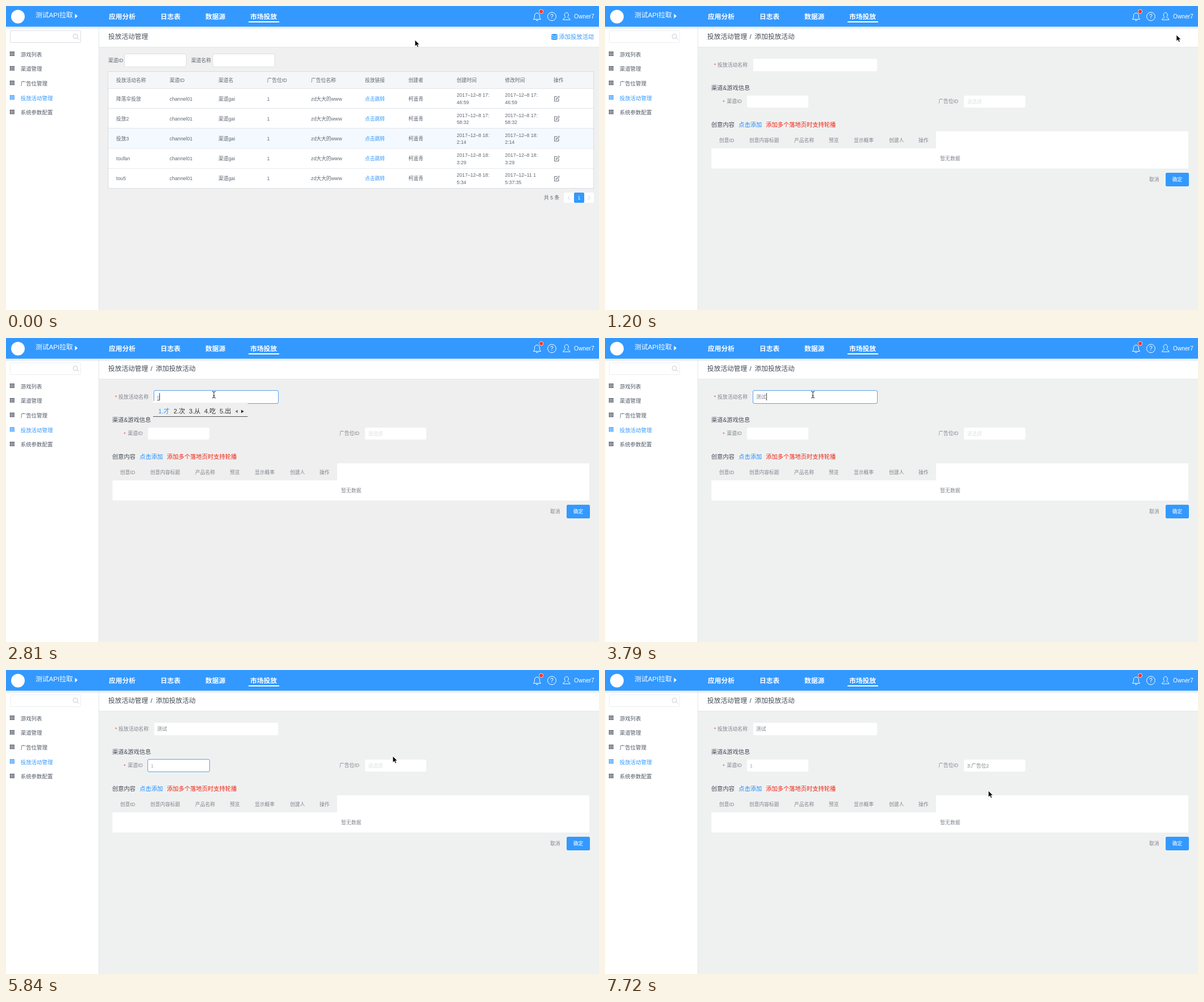
An HTML page that plays this animation: 1044x536 px, repeating every 8000 ms.

```html
<!DOCTYPE html>
<html lang="zh-CN">
<head>
<meta charset="utf-8">
<title>投放活动管理</title>
<style>
html, body { margin: 0; width: 100%; height: 100%; overflow: hidden; background: #f0f0f0; }
svg { display: block; width: 100vw; height: 100vh; }
text { font-family: "Liberation Sans", "Noto Sans CJK SC", "Noto Sans CJK", sans-serif; white-space: pre; }
</style>
</head>
<body>
<svg id="stage" viewBox="0 0 1044 536" xmlns="http://www.w3.org/2000/svg"></svg>
<script>
const BLUE = '#3399ff', INK = '#5f6773', LINE = '#d9dde2', SOFT = '#80858c';
const LOOP = 8000;

// Text is placed by its left edge and vertical centre.
const text = (x, y, s, size = 8.75, fill = INK, extra = '') =>
  `<text x="${x}" y="${(y + size * 0.37).toFixed(2)}" font-size="${size}" fill="${fill}" ${extra}>${s}</text>`;
const rect = (x, y, w, h, fill, extra = '') =>
  `<rect x="${x}" y="${y}" width="${w}" height="${h}" fill="${fill}" ${extra}/>`;
const line = (d, stroke, width = 1, extra = '') =>
  `<path d="${d}" fill="none" stroke="${stroke}" stroke-width="${width}" ${extra}/>`;
const group = (id, body) => `<g id="${id}">${body}</g>`;
const box = (x, y, w, h) => rect(x + 0.5, y + 0.5, w - 1, h - 1, '#fff', `rx="2.5" stroke="${LINE}"`);

function header() {
  const nav = [[181, '应用分析'], [272, '日志表'], [351, '数据源'], [430, '市场投放']];
  return rect(0, 0, 1044, 36.5, BLUE) +
    '<circle cx="21" cy="18.8" r="12" fill="#fff"/>' +
    text(52, 15.8, '测试API拉取', 11.7, '#fff', 'font-weight="500"') +
    '<path d="M121.5 13.7 L126 17.8 L121.5 22 Z" fill="#fff"/>' +
    nav.map(([x, s]) => text(x, 18.6, s, 11.75, '#fff', 'font-weight="600"')).join('') +
    rect(427, 27, 54, 2, '#fff') +
    line('M928.5 23.5 H941.5 C939.5 21.5 939.5 20 939.5 17.5 C939.5 14 937.5 12.5 935 12.5 C932.5 12.5 930.5 14 930.5 17.5 C930.5 20 930.5 21.5 928.5 23.5 Z M933 25.5 H937', '#fff') +
    '<circle cx="942.2" cy="9.7" r="3.6" fill="#f5372b" stroke="#fff" stroke-width=".7"/>' +
    '<circle cx="961" cy="18.5" r="7.4" fill="none" stroke="#fff"/>' +
    text(958.1, 18.5, '?', 10.5, '#fff') +
    line('M985 19.5 C982 17 983 11.7 986.8 11.7 C990.6 11.7 991.6 17 988.6 19.5 C988.6 21 993 21 993 24.3 H980.7 C980.7 21 985 21 985 19.5 Z', '#fff') +
    text(1000, 18.5, 'Owner7', 10.2, '#fff');
}

function sidebar() {
  const items = ['游戏列表', '渠道管理', '广告位管理', '投放活动管理', '系统参数配置'];
  const row = (s, i) => {
    const y = 85.3 + i * 25.65, on = i === 3;
    return rect(6.8, y - 5, 8, 7.8, on ? BLUE : '#4d5561') +
      line(`M6.8 ${y - 2.3} h8 M6.8 ${y + 0.3} h8 M9.4 ${y - 5} v8 M12.2 ${y - 5} v8`, '#fff', 0.6) +
      text(25.7, y, s, 9.45, on ? BLUE : '#535b67');
  };
  return rect(0, 36.5, 163, 500, '#fff') + rect(163, 37, 1, 499, '#e3e5e7') +
    rect(7.5, 43.5, 124, 21, '#fff', `id="search" stroke="${LINE}" rx="1"`) +
    '<circle cx="122.2" cy="53.3" r="4" fill="none" stroke="#c3c9d0"/>' +
    line('M125.2 56.3 L128.3 59.3', '#c3c9d0') +
    items.map(row).join('');
}

function listPage() {
  const cols = [194, 288, 374, 459.5, 537, 632, 708.5, 793.5, 878.5, 964];
  const heads = ['投放活动名称', '渠道ID', '渠道名', '广告位ID', '广告位名称', '投放链接', '创建者', '创建时间', '修改时间', '操作'];
  const a = ['2017–12–8 17:', '46:59'], b = ['2017–12–8 17:', '58:32'];
  const c = ['2017–12–8 18:', '2:14'], d = ['2017–12–8 18:', '3:29'];
  const rows = [['降落伞投放', a, a], ['投放2', b, b], ['投放3', c, c], ['toufan', d, d],
    ['tou5', ['2017–12–8 18:', '5:34'], ['2017–12–11 1', '5:37:35']]];
  const row = ([name, made, edited], i) => {
    const top = 146 + i * 35.2, y = top + 17.4;
    const cells = [name, 'channel01', '渠道gai', '1', 'zd大大的www', '点击跳转', '柯遥青'];
    const date = (s, x) => text(x, y - 6.3, s[0], 8.65) + text(x, y + 6.3, s[1], 8.65);
    return rect(180.5, top, 854, 35.2, '#fff', `id="row${i}"`) +
      line(`M180 ${Math.round(top + 35.2) - 0.5} H1035`, '#e1e5ea') +
      cells.map((s, k) => text(cols[k], y, s, 8.75, k === 5 ? BLUE : INK)).join('') +
      date(made, cols[7]) + date(edited, cols[8]) +
      line(`M970 ${y - 3.6} h-4.3 v8 h7.3 v-4.3 M968.3 ${y + 1.7} l.5 -2 l4.4 -4.3 l1.3 1.3 l-4.4 4.4 Z`, '#515a65', 0.9);
  };
  return text(180, 54, '投放活动管理', 11.7, '#4a525e', 'font-weight="500"') +
    '<path d="M960 51 C960 48.6 971 48.6 971 51 V58 C971 60.4 960 60.4 960 58 Z" fill="#3399ff"/>' +
    line('M960 52 Q965.5 55 971 52 M960 55.5 Q965.5 58.5 971 55.5', '#fff', 0.9) +
    text(973.5, 54.5, '添加投放活动', 10.25, BLUE) +
    text(180, 96, '渠道ID') + box(208, 84, 110, 24) +
    text(326, 96, '渠道名称') + box(363.5, 84, 110, 24) +
    rect(180, 115, 855, 31, '#f5f6f8') + line('M180 145.5 H1035', '#e1e5ea') +
    heads.map((s, i) => text(cols[i], 131, s)).join('') +
    rows.map(row).join('') +
    rect(179.5, 115.5, 855, 206, 'none', `stroke="${LINE}"`) +
    text(947, 338, '共 5 条') +
    rect(982, 329, 53, 18, '#fff', 'rx="2"') + rect(1000, 329, 18, 18, BLUE, 'rx="2"') +
    text(1006.6, 338, '1', 8.75, '#fff') +
    line('M993 334.5 l-3.5 3.7 l3.5 3.7 M1024.5 334.5 l3.5 3.7 l-3.5 3.7', '#c5cad0', 0.9);
}

// A white input with a hidden one-pixel focus ring on its outer edge.
const field = (id, x, y, w, h) => rect(x + 1, y + 1, w - 2, h - 2, '#fff', 'rx="2.5"') +
  rect(x + 0.5, y + 0.5, w - 1, h - 1, 'none', `id="${id}" rx="2.5" stroke="#57a3f3"`);

function formPage() {
  const heads = [[201, '创意ID'], [254, '创意内容标题'], [333, '产品名称'], [394, '预览'], [438, '显示概率'], [500, '创建人'], [552, '操作']];
  const star = (x, y) => text(x, y + 1, '*', 8.75, '#ee4b35');
  return text(180, 54, '投放活动管理', 11.7, '#434b56') +
    text(254.5, 54, '/', 11.7, '#434b56') + text(263.5, 54, '添加投放活动', 11.7, '#434b56') +
    star(192, 103) + text(198, 103.3, '投放活动名称', 8.85, SOFT) + field('nameFocus', 260, 92, 220, 24) +
    text(187, 144.5, '渠道&amp;游戏信息', 10.25, '#454c57') +
    star(207.3, 168) + text(214.5, 168, '渠道ID', 8.75, SOFT) + field('channelFocus', 249, 157, 110, 23) +
    text(587, 168, '广告位ID', 8.75, SOFT) + field('slotFocus', 631, 157, 110, 23) +
    text(187, 209, '创意内容', 10.25, '#454c57') + text(235.3, 209, '点击添加', 10.25, '#1c8dff') +
    text(283.3, 209, '添加多个落地页时支持轮播', 10.25, '#f5200f') +
    rect(583, 221, 444, 31, '#fff') + rect(187.5, 251, 839.5, 35.5, '#fff') +
    heads.map(([x, s]) => text(x, 236.5, s, 8.75, SOFT)).join('') +
    text(590, 268.5, '暂无数据', 8.85, SOFT) +
    text(958, 306, '取消', 8.75, SOFT) +
    rect(987, 294, 41, 24, BLUE, 'rx="2.5"') + text(998.7, 306, '确定', 8.75, '#fff') +
    text(266, 104, '', 8.85, SOFT, 'id="nameText"') +
    line('', '#444', 1, 'id="underline"') + line('', '#444', 1, 'id="caret"') +
    text(255, 168.5, '', 8.75, '#aaa', 'id="channelText"') +
    text(637.5, 168.5, '', 8.75, SOFT, 'id="slotText"') +
    group('options', ['3:广告位2', '4:广告位3', '5:广告位4'].map((s, i) => text(642, 214 + i * 21.7, s, 8.75, SOFT)).join('')) +
    group('popup', rect(259, 113, 166.5, 25.5, '#efefef') + rect(259, 111, 166.5, 3, '#fff') +
      line('M259 138.5 H425.5', '#555') + group('words', '') +
      '<path d="M408 126.5 v6 l-4.5 -3 Z" fill="#777"/><path d="M414 126.5 v6 l5 -3 Z" fill="#333"/>');
}

const pointers =
  group('arrow', '<path d="M0 0 V11 L2.6 8.7 L4.4 12.6 L6.3 11.8 L4.6 7.9 H8 Z" fill="#000" stroke="#fff" stroke-width=".7"/>') +
  group('beam', line('M-3 -5.8 Q0 -5.8 0 -4 Q0 -5.8 3 -5.8 M0 -4 V4 M-3 5.8 Q0 5.8 0 4 Q0 5.8 3 5.8 M-1.5 1.8 H1.5', '#222')) +
  group('hand', '<path d="M-1.3 1 Q0 -.6 1.3 1 V5 L6.4 6 Q7.3 6.4 7 8 L6 13 H-.5 L-3.8 8.5 Q-3.8 6.8 -1.3 8 Z" fill="#fff" stroke="#000" stroke-width=".9"/>');

const stage = document.getElementById('stage');
stage.innerHTML = rect(0, 0, 1044, 536, '#f0f0f0', 'id="ground"') +
  rect(164, 36.5, 880, 36, '#fff') + rect(164, 72, 880, 1, '#e4e6e8') +
  sidebar() + rect(0, 36.5, 1044, 4, '#dfe4e9', 'opacity=".55"') + header() +
  group('list', listPage()) + group('form', formPage()) + group('pointer', pointers);

const el = id => document.getElementById(id);
const show = (id, on) => el(id).setAttribute('display', on ? 'inline' : 'none');
const put = (id, s) => { if (el(id).textContent !== s) el(id).textContent = s; };
const during = (t, a, b) => t >= a && t < b;

// Moves: first step, last step, number of steps, end point.
const moves = [
  [90, 90, 1, 820, 150], [300, 300, 1, 856, 150], [420, 420, 1, 855, 108],
  [500, 670, 3, 1006, 51], [1440, 2180, 9, 366, 100], [4410, 4950, 7, 303, 168],
  [5480, 5840, 5, 681, 152], [5930, 6200, 4, 682, 163], [6740, 7280, 7, 675, 213]
];

function pointerAt(t) {
  let x = 720, y = 60;
  for (const [from, to, steps, ex, ey] of moves) {
    if (t < from) break;
    const gap = steps > 1 ? (to - from) / (steps - 1) : 1;
    const p = Math.min(1, (Math.floor((t - from) / gap + 1e-6) + 1) / steps);
    const e = p * p * (3 - 2 * p);
    x += (ex - x) * e;
    y += (ey - y) * e;
  }
  return [x, y];
}

function pointerKind(t, x) {
  if (during(t, 670, 1200) || during(t, 6110, 7460)) return 'hand';
  if (during(t, 420, 500) || during(t, 1440, 5840) && x < 479 && (t < 5480 || x < 358)) return 'beam';
  return 'arrow';
}

// Input method states: start, typed letters, candidates.
const typing = [
  [2810, 'c', '才次从吃出'.split('')],
  [2980, 'ce', '测册侧策厕'.split('')],
  [3160, 'ce s', ['测试', '测', '册', '侧']],
  [3520, 'ce sh', ['测试', '测', '册', '侧']],
  [3610, 'ce shi', ['测试', '侧室', '测', '册']]
];

function candidates(words) {
  let x = 268;
  return words.map((w, i) => {
    const out = text(x, 128.5, `${i + 1}.${w}`, 11.2, i ? '#333' : BLUE);
    x += 15.8 + 11.2 * w.length;
    return out;
  }).join('');
}

let lastWords = '';
function drawTyping(t) {
  const state = during(t, 2810, 3790) ? typing.filter(s => t >= s[0]).pop() : null;
  show('popup', state);
  show('underline', state);
  put('nameText', state ? state[1] : t >= 3790 ? '测试' : '');
  if (state && lastWords !== state[1]) {
    lastWords = state[1];
    el('words').innerHTML = candidates(state[2]);
  }
  const end = 266 + el('nameText').getComputedTextLength();
  el('underline').setAttribute('d', `M266 109.5 H${end}`);
  const inChannel = t >= 4860;
  const x = inChannel ? 255.5 : Math.round(end) + 0.5;
  el('caret').setAttribute('d', `M${x} ${inChannel ? 162 : 97} v13`);
  show('caret', during(t, 2360, 4240) || during(t, 4860, 5220));
  return state;
}

function fade(id, t, from, to) {
  const o = Math.min((t - from) / 180 + 0.4, (to - t) / 180 + 1, 1);
  el(id).setAttribute('opacity', t < from ? 0 : Math.max(0, o));
}

function draw(t) {
  const form = t >= 1200;
  show('list', !form);
  show('form', form);
  el('search').setAttribute('stroke', form ? '#eceef0' : LINE);
  el('row2').setAttribute('fill', t < 90 ? '#f3f9fe' : '#fff');
  el('row0').setAttribute('fill', during(t, 300, 500) ? '#eef7fe' : '#fff');
  const composing = drawTyping(t);
  el('ground').setAttribute('fill', !form ? '#f0f0f0' : composing ? '#efefef' : '#eff1f1');
  fade('nameFocus', t, 2270, 4860);
  fade('channelFocus', t, 4860, 6200);
  fade('slotFocus', t, 6200, 7460);
  put('channelText', t >= 5220 ? '1' : '');
  const chosen = t >= 7280;
  put('slotText', chosen ? '3:广告位2' : '请选择');
  el('slotText').setAttribute('fill', chosen ? SOFT : '#dfe1e4');
  fade('options', t, 6470, 7460);
  const [x, y] = pointerAt(t), kind = pointerKind(t, x);
  for (const k of ['arrow', 'beam', 'hand']) show(k, k === kind);
  el('pointer').setAttribute('transform', `translate(${x.toFixed(1)} ${y.toFixed(1)})`);
}

const start = performance.now();
function tick(now) {
  draw(Math.max(0, now - start) % LOOP);
  requestAnimationFrame(tick);
}
draw(0);
requestAnimationFrame(tick);
</script>
</body>
</html>
```
